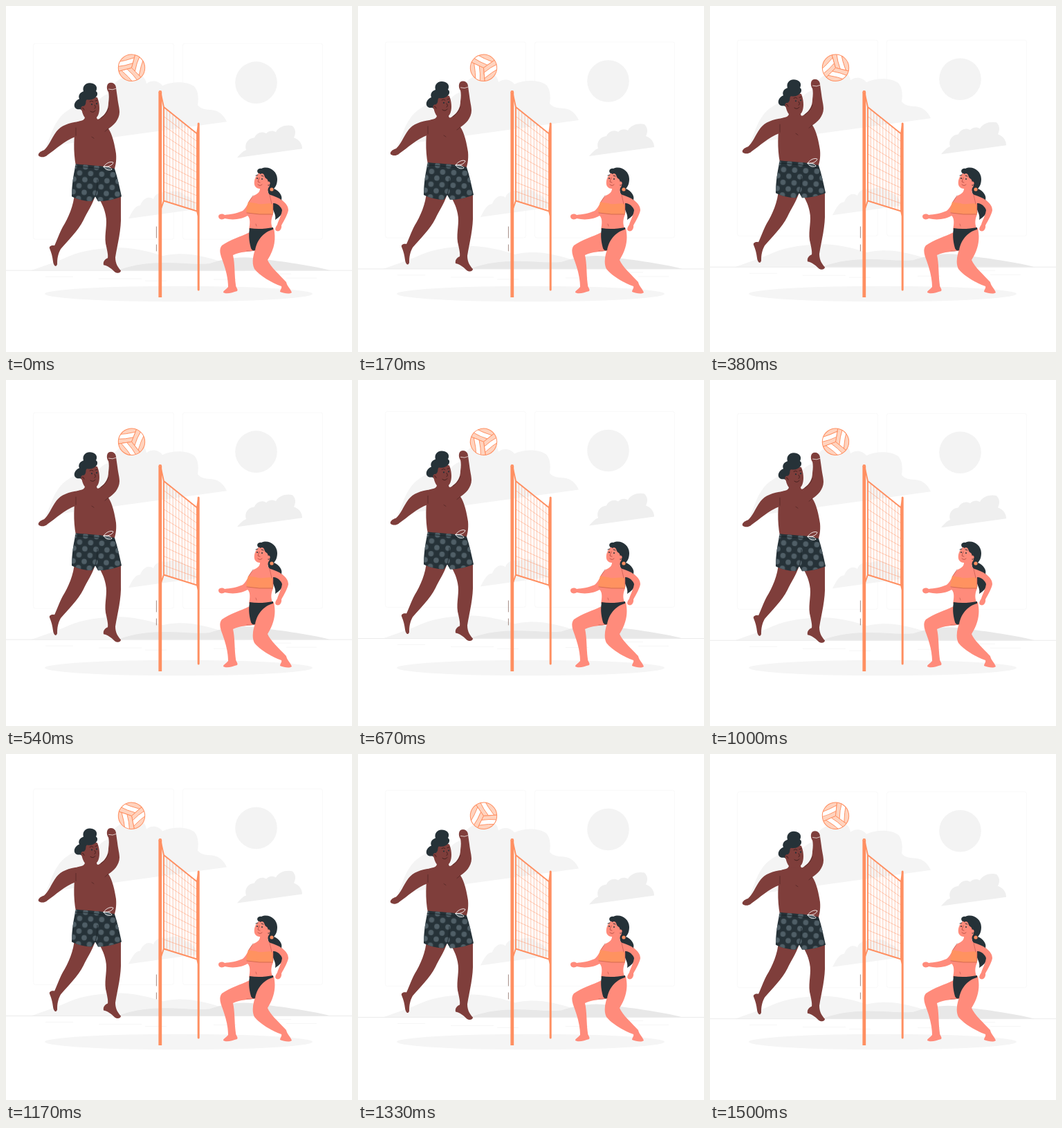
An HTML page that plays this animation: 500 by 500 pixels, repeating every 1.54 s.

```html
<!DOCTYPE html>
<html lang="en">
<head>
<meta charset="utf-8">
<title>Beach volleyball</title>
<style>
html, body { margin: 0; height: 100%; overflow: hidden; background: #fff; }
svg { display: block; width: 100vw; height: 100vh; }
.line { fill: none; stroke-linecap: round; stroke-linejoin: round; }
.man { fill: #7f3e3b; }
.woman { fill: #ff8b7b; }
.dark { fill: #263238; }
.orange { stroke: #ff8f61; }
</style>
</head>
<body>
<svg viewBox="0 0 500 500">
  <defs>
    <pattern id="dots" x="106" y="224" width="16" height="18.4" patternUnits="userSpaceOnUse" patternTransform="rotate(3 130 250)">
      <g fill="#505f67"><circle cx="8" cy="9.2" r="3.8"/>
      <circle cx="0" cy="0" r="3.8"/><circle cx="16" cy="0" r="3.8"/>
      <circle cx="0" cy="18.4" r="3.8"/><circle cx="16" cy="18.4" r="3.8"/></g>
    </pattern>
    <clipPath id="round"><circle r="19.3"/></clipPath>
    <path id="shorts" d="M101 228C118 230 140 230 157 235C161 247 164 261 167 275C157 279 145 282 133 282L129 275L124 282C114 282 103 279 95 275C95 258 98 241 101 228Z"/>
    <g id="panel" class="orange" stroke-width=".9">
      <path fill="#ffd3be" d="M0 0H20V20H-11.5Z"/>
      <path fill="#fff" d="M-3.5 6Q8 5 20 7V13.5Q6 12 -7.6 13.2Z"/>
    </g>
  </defs>

  <g class="float">
    <g fill="#fff" stroke="#f9f9f9">
      <rect x="39.5" y="54" width="203" height="283" rx="3"/>
      <rect x="255.5" y="54" width="202" height="283" rx="3"/>
    </g>
    <circle cx="361.5" cy="110.5" r="30.3" fill="#f3f3f3"/>
    <g fill="#f4f4f4">
      <path d="M57 203C63 194 66 177 75 165C82 154 93 147 105 143C112 142 118 146 123 150C130 139 139 128 150 126C153 112 164 102 178 102C190 96 201 99 203 112C211 106 221 108 226 115C240 108 264 108 273 117C279 125 278 137 277 143C283 150 290 149 298 150C308 151 315 158 319 167Z"/>
      <path d="M177 307C182 298 186 288 194 288C197 279 206 273 213 279C215 271 225 267 232 270C242 265 254 267 259 274C266 275 272 280 278 293Z"/>
      <path d="M36 382C58 374 75 369 92 361C110 353 138 349 166 349C190 350 208 355 227 361C240 357 265 357 280 361C302 365 324 374 347 382Z"/>
    </g>
    <path fill="#efefef" d="M334 219C339 213 343 209 347 208C344 198 350 191 359 190C362 183 370 180 376 184C379 180 386 179 390 182C394 174 405 171 414 173C419 178 419 184 416 190C424 193 428 199 428 206Z"/>
    <path fill="#e8e8e8" d="M162 382C176 376 198 371 222 371C247 370 270 374 294 372C315 365 336 361 360 364C390 368 435 373 469 382Z"/>
    <path stroke="#ebebeb" d="M0 382H500"/>
    <path stroke="#f6f6f6" d="M57 391H97M134 394H196M201 397H232M364 387H412M405 393H449M300 395H333"/>
  </g>

  <ellipse cx="249.5" cy="416" rx="193.5" ry="11.3" fill="#f5f5f5"/>

  <g class="float">
    <g class="man">
      <path d="M99 270C98 288 90 306 82 319C77 328 73 340 70 346C66 345 62 347 63 350C66 357 67 362 68 369C69 375 72 378 74 373C74 365 75 358 79 351C89 339 104 325 112 309C117 298 124 289 129 274Z"/>
      <path d="M131 272C137 282 142 291 144 302C147 315 142 329 144 343C146 352 148 360 147 364C142 366 140 370 141 374C147 375 152 379 156 383C160 387 166 386 166 382C162 378 158 372 158 363C161 344 167 323 166 301L166 270Z"/>
      <path d="M105 167C91 168 79 173 73 181C65 192 62 202 55 208C49 210 46 213 47 216C50 219 56 219 60 215C72 207 83 195 102 188Z"/>
      <path d="M101 168C107 165 114 166 114 160H131C131 165 134 164 137 161C144 156 148 149 148 140C149 133 149 128 148 124C145 120 145 113 149 111C154 109 159 113 159 118L161 132C162 141 164 147 164 153C164 164 155 173 148 177C154 186 157 200 159 213C160 224 158 232 156 238L101 231C97 209 98 190 101 168Z"/>
      <path d="M110 139C113 133 125 129 132 132C135 139 136 149 134 155C132 164 120 167 114 161C110 156 108 147 110 139Z"/>
    </g>
    <path class="dark" d="M131 130C133 127 132 124 130 123C134 115 127 111 121 111C114 111 110 117 112 123C106 125 104 130 106 134C100 136 96 144 101 148C104 150 108 148 109 150C112 151 114 148 113 144C117 141 114 137 117 135C124 136 128 134 131 130Z"/>
    <circle cx="112" cy="148" r="3.6" class="man"/>
    <g class="line" stroke="#45211f" stroke-width="1">
      <path d="M121 138Q124 136 126 138M129 137L132 136M128 143Q131 147 128 148M122 152Q126 155 129 151M110 147Q112 146 113 150"/>
      <path stroke-width=".6" d="M137 162Q145 157 148 148M101 176V187M148 177L143 181M124 189L127 191"/>
    </g>
    <g class="dark"><circle cx="124" cy="142" r="1.1"/><circle cx="131" cy="141" r="1.1"/></g>
    <path class="line" d="M148.5 120Q154 122 159.5 119" stroke="#e8d9d5" stroke-width=".9"/>
    <use href="#shorts" class="dark"/>
    <use href="#shorts" fill="url(#dots)"/>
    <path class="line" stroke="#192227" stroke-width=".8" d="M129 275Q133 262 132 251M100 232Q124 232 157 239"/>
    <path class="line" stroke="#fff" stroke-width=".9" d="M141 232C145 226 152 224 155 226C154 230 147 233 141 232C144 237 150 238 153 236C152 233 146 231 141 232"/>
  </g>

  <path class="line" stroke="#8d7068" stroke-width=".8" d="M217.4 319V335M217.4 345V354"/>
  <g class="line orange">
    <path id="mesh" stroke-width=".6" opacity=".8"/>
    <path stroke-width="1.9" d="M224 128L228 146L276 184.5V296.5L228 281.5V146M278 172L276 184.5M276 296.5L278 304M228 281.5L224 293"/>
    <path stroke-width="4.8" d="M222.8 124.5V421" stroke-linecap="butt"/>
    <circle cx="222.8" cy="124.5" r="1.4" stroke-width="2"/>
    <path stroke-width="3" d="M278.2 170V410"/>
  </g>

  <g>
    <path class="dark" d="M365 242C361 239 364 234 369 235C379 230 392 238 392 250C392 258 389 262 387 264C395 267 400 275 398 280C408 291 399 303 389 309C391 301 385 296 384 286C382 276 378 270 377 260Z"/>
    <g class="woman">
      <path d="M387 321C390 335 389 350 378 367C382 377 396 389 405 399C406 405 411 408 413 414C409 417 402 415 396 413C396 410 399 408 398 405C384 400 367 390 359 380C354 370 358 357 362 346L358 326Z"/>
      <path d="M352 327C340 333 323 338 312 346C307 352 310 360 313 368C318 382 321 394 321 406C318 410 314 411 314 414C319 417 327 414 334 412C336 409 332 407 332 403C330 389 331 373 328 360C339 355 351 355 360 353L376 324Z"/>
      <path d="M365 242C360 246 358 253 359 258C360 263 365 264 367 264C367 270 362 272 358 274C350 280 349 291 342 296C333 300 324 301 316 302C312 299 307 301 307 304C307 308 312 310 316 307C328 310 341 308 349 303C353 306 353 314 351 323H386C382 315 383 308 386 301L386 285C391 284 398 290 399 295C398 303 393 311 392 316C389 320 388 324 391 325C395 327 399 322 398 317C402 310 407 301 408 295C408 285 396 277 382 273C378 271 378 267 379 263C382 260 382 253 379 252C376 249 377 243 373 241Z"/>
    </g>
    <path class="dark" d="M366 236C369 235 377 237 380 243C384 250 383 258 379 260C377 257 380 252 377 250C372 248 375 243 370 242L367 243Z"/>
    <circle cx="379" cy="256" r="2.6" class="woman"/>
    <circle cx="384" cy="265" r="2.6" fill="#ff8f61"/>
    <path fill="#ff9260" d="M350 283C355 285 360 284 365 286C373 287 380 284 385 286L386 301C373 302 360 302 347 298Q348 290 350 283Z"/>
    <path class="dark" d="M352 321C363 323 375 322 386 320V323C376 325 363 335 360 353C358 354 355 353 354 350C352 342 350 334 352 321Z"/>
    <g class="line" stroke="#b75047" stroke-width=".9">
      <path d="M366 248L364 254L367 255M364 258Q367 261 370 258"/>
      <path stroke-width=".6" d="M351 283L357 274M381 273L384 286M386 287L386 299M361 315L362 318M348 299Q366 302 385 301M360 353Q352 355 348 354"/>
    </g>
    <path class="line" stroke="#263238" stroke-width=".9" d="M361 245L364 244M369 245L372 246"/>
    <g class="dark"><circle cx="363" cy="249" r="1"/><circle cx="370" cy="250" r="1"/></g>
  </g>

  <g id="ball">
    <g clip-path="url(#round)">
      <use href="#panel"/>
      <use href="#panel" transform="rotate(120)"/>
      <use href="#panel" transform="rotate(240)"/>
    </g>
    <circle class="line orange" r="19.2" stroke-width="1"/>
  </g>
</svg>
<script>
const LOOP = 1540, LIFT = 10, LEAD = 40;
const floaters = document.querySelectorAll('.float');
const ball = document.getElementById('ball');

// Net corners: left edge x 228 (y 146..281.5), right edge x 276 (y 184.5..296.5)
const mix = (a, b, k) => a + (b - a) * k;
const netPoint = (u, v) =>
  `${mix(228, 276, u)} ${mix(mix(146, 281.5, v), mix(184.5, 296.5, v), u)}`;
let mesh = '';
for (let i = 1; i < 11; i++) {
  mesh += `M${netPoint(i / 11, 0)}L${netPoint(i / 11, 1)}`;
  if (i < 10) mesh += `M${netPoint(0, i / 10)}L${netPoint(1, i / 10)}`;
}
document.getElementById('mesh').setAttribute('d', mesh);

const start = performance.now();
function draw() {
  const time = performance.now() - start;
  const phase = ((time + LEAD) / LOOP) % 1;
  const y = 0.7 - LIFT * (1 - Math.abs(1 - 2 * phase));
  floaters.forEach(el => el.setAttribute('transform', `translate(0 ${y})`));
  ball.setAttribute('transform', `translate(181.5 89.3) rotate(${45 + 360 * time / LOOP})`);
  requestAnimationFrame(draw);
}
draw();
</script>
</body>
</html>
```
